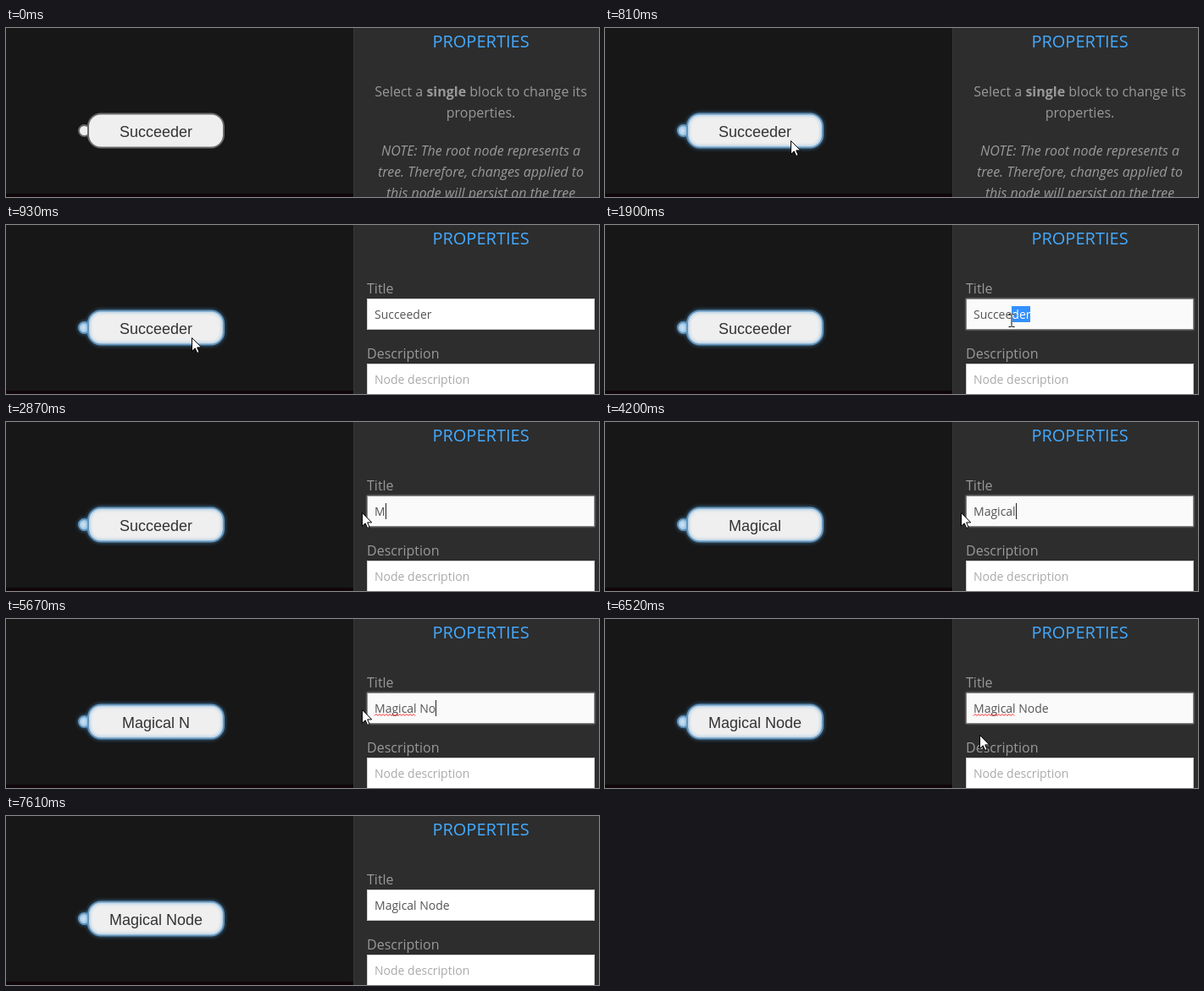
Animation, 700 px wide and 200 px high, one loop 7660 ms. Source, as an HTML page:

```html
<!DOCTYPE html>
<html lang="en">
<head>
<meta charset="utf-8">
<title>Renaming a node</title>
<style>
  html, body { margin: 0; width: 100%; height: 100%; overflow: hidden; background: #171717; }
  svg { display: block; width: 700px; height: 200px; }
  text { white-space: pre; }
  .panel { font: 16px "Open Sans", sans-serif; fill: #999; }
  .hint { text-anchor: middle; }
  .head { font-size: 20px; fill: #44aaff; }
  .field { font-size: 14px; fill: #555; }
  .input { fill: #fff; stroke: #ccc; }
  .focus .input { fill: #fafafa; stroke: #888; filter: drop-shadow(0 0 1px #999); }
  .name { font: 18px "Liberation Sans", Arial, sans-serif; fill: #333; text-anchor: middle; }
  .shape { fill: #efefef; }
  .line { fill: none; stroke: #6b6b6b; stroke-width: 2; }
  .selected .line { stroke: #6795ba; filter: drop-shadow(0 0 2px #4b9bd8); }
  .selected circle.shape { fill: #d3e4f2; }
  #beam { mix-blend-mode: difference; }
</style>
</head>
<body>
<svg viewBox="0 0 700 200">
  <rect width="700" height="200" fill="#171717"/>
  <rect y="196" width="410" height="4" fill="#10060a"/>

  <g id="node">
    <circle class="shape" cx="92.5" cy="121.5" r="6.5"/>
    <circle class="line" cx="92.5" cy="121.5" r="6.5"/>
    <rect class="shape" x="97" y="101.5" width="160" height="40" rx="15"/>
    <rect class="line" x="97" y="101.5" width="160" height="40" rx="15"/>
    <text class="name" id="name" x="177" y="129"></text>
  </g>

  <g class="panel">
    <rect x="410" width="290" height="200" fill="#2d2d2d"/>
    <rect x="410" width="1" height="200" fill="#383838"/>
    <text class="hint head" x="560.5" y="23">PROPERTIES</text>
    <g class="hint" id="hint">
      <text x="560.5" y="81">Select a <tspan font-weight="700">single</tspan> block to change its</text>
      <text x="560.5" y="106">properties.</text>
      <g font-style="italic">
        <text x="560.5" y="151">NOTE: The root node represents a</text>
        <text x="560.5" y="176">tree. Therefore, changes applied to</text>
        <text x="560.5" y="201">this node will persist on the tree</text>
      </g>
    </g>
    <g id="form">
      <text x="426" y="81">Title</text>
      <rect class="input" x="426.5" y="87.5" width="268" height="36"/>
      <rect id="mark" y="96" height="19" fill="#3390ff"/>
      <text class="field" x="435" y="111"><tspan id="plain"></tspan><tspan id="picked" fill="#fff"></tspan></text>
      <path id="wave" fill="none" stroke="#f22" stroke-width="1"/>
      <rect id="caret" y="96" width="1" height="19" fill="#222"/>
      <text x="426" y="158">Description</text>
      <rect x="426.5" y="164.5" width="268" height="40" fill="#fff" stroke="#ccc"/>
      <text class="field" x="435" y="188" style="fill:#aaa">Node description</text>
    </g>
  </g>

  <path id="arrow" d="M.5.5v15.8l3.7-3.5 2.5 5.7 2.4-1-2.4-5.6h5z" fill="#fff" stroke="#000"/>
  <path id="beam" d="M-3.5-7.5h3M.5-7.5h3M0-7V7M-3.5 7.5h3M.5 7.5h3" fill="none" stroke="#fff"/>
</svg>
<script>
const LOOP = 7660, LEFT = 435;
const $ = id => document.getElementById(id);
const ctx = document.createElement("canvas").getContext("2d");

const arrow = (x, y) => ({ arrow: [x, y], beam: null });
const beam = (x, y) => ({ beam: [x, y], arrow: null });
const type = text => ({ text, pick: null, caret: true });

const start = {
  name: "Succeeder", text: "Succeeder", pick: null, caret: false, wave: false,
  selected: false, form: false, focus: false, arrow: null, beam: null
};

// Each step changes part of the state and holds until the next one.
const steps = [
  [280, arrow(487, 182)],
  [420, arrow(398, 170)],
  [550, arrow(296, 150)],
  [670, arrow(224, 136)],
  [810, { ...arrow(219, 133), selected: true }],
  [930, { form: true }],
  [1080, arrow(335, 128)],
  [1210, arrow(421, 124)],
  [1370, beam(474, 121)],
  [1490, beam(511, 120)],
  [1630, { ...beam(508, 117), focus: true, caret: true }],
  [1760, { ...beam(499, 115), caret: false, pick: 8 }],
  [1900, { ...beam(480, 113), pick: 6 }],
  [2020, { ...beam(445, 108), pick: 1 }],
  [2140, { ...arrow(421, 102), pick: 0 }],
  [2290, arrow(421, 97)],
  [2450, arrow(420, 107)],
  [2870, type("M")],
  [2990, { name: "M" }],
  [3140, type("Ma")],
  [3270, { name: "Ma" }],
  [3540, type("Magi")],
  [3670, { name: "Magi" }],
  [3810, type("Magica")],
  [3940, { name: "Magica" }],
  [4080, type("Magical")],
  [4200, { name: "Magical" }],
  [4700, { ...type("Magical "), wave: true }],
  [4860, { name: "Magical " }],
  [5290, { caret: false }],
  [5410, type("Magical N")],
  [5550, { name: "Magical N" }],
  [5670, type("Magical No")],
  [5790, { ...type("Magical Nod"), name: "Magical No" }],
  [5910, { ...type("Magical Node"), name: "Magical Nod" }],
  [6030, { name: "Magical Node" }],
  [6400, arrow(430, 122)],
  [6520, { ...arrow(442, 137), caret: false }],
  [6670, { arrow: null, caret: true }],
  [7060, { caret: false }],
  [7610, { focus: false, wave: false }]
];

const edge = text => {
  ctx.font = '14px "Open Sans", sans-serif';
  return LEFT + ctx.measureText(text).width;
};

const show = (id, on) => { $(id).style.display = on ? "" : "none"; };

function place(id, pos) {
  show(id, pos);
  if (pos) $(id).setAttribute("transform", `translate(${pos})`);
}

function zigzag(from, to) {
  let d = `M${from} 114.5`;
  for (let x = from + 2, up = true; x <= to; x += 2, up = !up) d += `L${x} ${up ? 112.5 : 114.5}`;
  return d;
}

function render(s) {
  const cut = s.pick ?? s.text.length;
  const from = edge(s.text.slice(0, cut)), to = edge(s.text);
  $("name").textContent = s.name;
  $("plain").textContent = s.text.slice(0, cut);
  $("picked").textContent = s.text.slice(cut);
  $("mark").setAttribute("x", Math.round(from));
  $("mark").setAttribute("width", Math.round(to) - Math.round(from));
  $("caret").setAttribute("x", Math.round(to));
  $("node").classList.toggle("selected", s.selected);
  $("form").classList.toggle("focus", s.focus);
  show("hint", !s.form);
  show("form", s.form);
  show("caret", s.caret);
  show("wave", s.wave);
  place("arrow", s.arrow);
  place("beam", s.beam);
}

$("wave").setAttribute("d", zigzag(LEFT, edge("Magical")));

let shown = -1;
function tick() {
  const t = performance.now() % LOOP;
  const count = steps.filter(([at]) => at <= t).length;
  if (count !== shown) {
    shown = count;
    render(Object.assign({}, start, ...steps.slice(0, count).map(step => step[1])));
  }
  requestAnimationFrame(tick);
}
tick();
</script>
</body>
</html>
```
